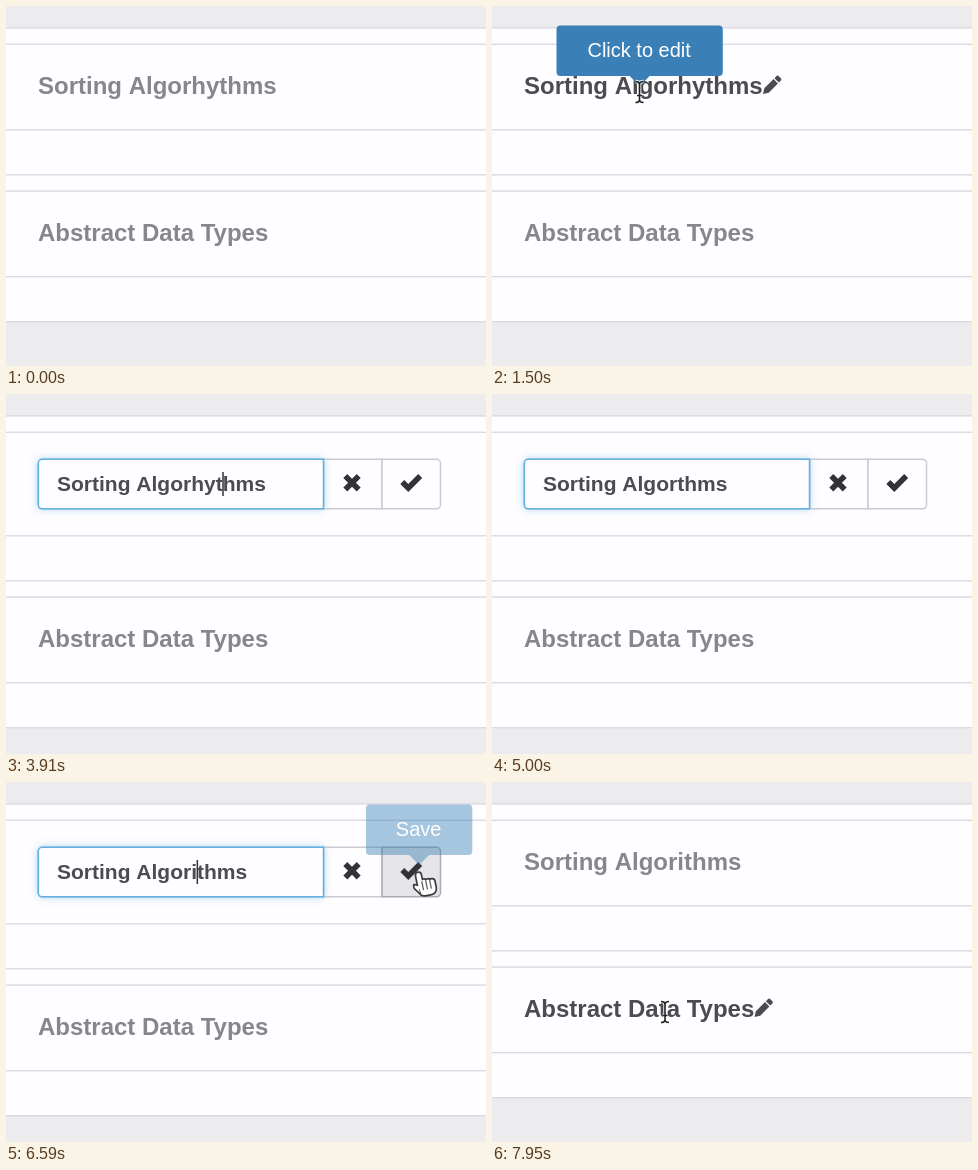
These frames come from a looping animation (480x360 px, 8 s). An HTML page with a canvas:

```html
<!DOCTYPE html>
<html lang="en">
<head>
<meta charset="utf-8">
<title>Inline title editing</title>
<style>
html, body { margin: 0; width: 100%; height: 100%; overflow: hidden; background: #ecebed; }
canvas { display: block; }
</style>
</head>
<body>
<canvas id="stage" width="480" height="360"></canvas>
<script>
const ctx = document.getElementById('stage').getContext('2d');
const LOOP = 8000, EDIT = 1680, SAVE = 7230;
const FAMILY = '"Liberation Sans", Arial, sans-serif';
const PAPER = '#fefdff', INK = '#4c4b4f', MUTED = '#87868a', ICON = '#333336', EDGE = '#cbcacf';

const keys = [
  [2950, 'left'], [3410, 'left'], [3550, 'left'], [4090, 'left'],
  [4360, 'delete'], [4500, 'delete'], [5230, 'i']
];

// Pointer moves: start, end, x, y
const moves = [
  [500, 1000, 147.5, 86], [2060, 2270, 241, 86], [2430, 2450, 305, 82], [2450, 3000, 309, 92],
  [5820, 5950, 407, 55], [5950, 6050, 426, 40], [6050, 6270, 425, 92], [6390, 6590, 412, 91],
  [7480, 7680, 190, 260], [7890, 7930, 173, 230]
];

const clamp = v => Math.max(0, Math.min(1, v));
const ramp = (t, a, b) => clamp((t - a) / (b - a));
const ease = u => u * u * (3 - 2 * u);
const inside = (p, x, y, w, h) => p && p.x >= x && p.x <= x + w && p.y >= y && p.y <= y + h;

function pointerAt(t) {
  if (t < 500 || t >= 3000 && t < 5590) return null;
  const p = { x: 160, y: 229 };
  for (const [a, b, x, y] of moves) {
    const u = ease(ramp(t, a, b));
    p.x += (x - p.x) * u;
    p.y += (y - p.y) * u;
  }
  return p;
}

function typedAt(t) {
  let str = 'Sorting Algorhythms', at = str.length;
  for (const [time, key] of keys) {
    if (time > t) break;
    const tail = str.slice(at);
    if (key === 'left') at--;
    else if (key === 'delete') str = str.slice(0, --at) + tail;
    else str = str.slice(0, at++) + key + tail;
  }
  return { str, at };
}

function text(str, x, y, size, color, weight = 'bold') {
  ctx.font = `${weight} ${size}px ${FAMILY}`;
  ctx.fillStyle = color;
  ctx.fillText(str, x, y);
}

function polyline(points, width, color) {
  ctx.beginPath();
  points.forEach(([x, y]) => ctx.lineTo(x, y));
  ctx.strokeStyle = color;
  ctx.lineWidth = width;
  ctx.stroke();
}

function box(x, w, radii, fill, stroke) {
  ctx.beginPath();
  ctx.roundRect(x, 65.3, w, 49.5, radii);
  ctx.fillStyle = fill;
  ctx.fill();
  ctx.shadowColor = 'transparent';
  ctx.strokeStyle = stroke;
  ctx.lineWidth = 1.5;
  ctx.stroke();
}

function page(shift) {
  ctx.fillStyle = '#ecebed';
  ctx.fillRect(0, 0, 480, 360);
  ctx.fillStyle = PAPER;
  ctx.fillRect(0, 22, 480, 294 + shift);
  ctx.fillStyle = '#dbdae0';
  const rule = y => ctx.fillRect(0, y, 480, 1.4);
  rule(21.2);
  rule(37.6);
  rule(184.4 + shift);
  for (const y of [123.1, 270]) {
    rule(y + shift);
    rule(y + shift + 45);
  }
}

function pencil(x, y) {
  ctx.save();
  ctx.translate(x, y);
  ctx.rotate(-Math.PI / 4);
  ctx.fillStyle = INK;
  ctx.beginPath();
  ctx.moveTo(0, 0);
  ctx.lineTo(5, -3.1);
  ctx.lineTo(18, -3.1);
  ctx.lineTo(18, 3.1);
  ctx.lineTo(5, 3.1);
  ctx.roundRect(19.3, -3.1, 4.4, 6.2, [0, 1.5, 1.5, 0]);
  ctx.fill();
  ctx.restore();
}

function title(str, y, hover, tipX) {
  text(str, 32, y, 24, hover ? INK : MUTED);
  if (hover) pencil(tipX, y);
}

function tooltip(str, x, y, w, alpha) {
  if (alpha <= 0) return;
  const mid = x + w / 2;
  ctx.save();
  ctx.globalAlpha = alpha;
  ctx.beginPath();
  ctx.roundRect(x, y, w, 50.5, 4);
  ctx.moveTo(mid - 10, y + 50.5);
  ctx.lineTo(mid + 10, y + 50.5);
  ctx.lineTo(mid, y + 60.5);
  ctx.fillStyle = '#3a80b7';
  ctx.fill();
  ctx.globalAlpha = 1;
  ctx.textAlign = 'center';
  text(str, mid - 0.5, y + 31.4, 20, '#fff', 'normal');
  ctx.restore();
}

function button(x, radii, hover) {
  box(x, 58.5, radii, hover ? '#e5e4e7' : PAPER, hover ? '#adacb0' : EDGE);
}

function field(t) {
  const glow = ramp(t, EDIT, EDIT + 220) * (1 - ramp(t, 7040, 7190));
  box(32.3, 285.2, [4, 0, 0, 4], PAPER, EDGE);
  ctx.save();
  ctx.globalAlpha = glow;
  ctx.shadowColor = 'rgba(102,180,236,.6)';
  ctx.shadowBlur = 8;
  box(32.3, 285.2, [4, 0, 0, 4], PAPER, '#66b0e0');
  ctx.restore();

  const { str, at } = typedAt(t);
  text(str, 51, 97.4, 21, INK);
  const blink = t >= 5000 && t < 5230 || t >= 5680 && t < 5860;
  if (!blink && t < 7180) {
    const x = 51 + ctx.measureText(str.slice(0, at)).width;
    ctx.fillStyle = ICON;
    ctx.fillRect(x - 0.4, 78, 1.5, 24);
  }
}

function editor(t, p) {
  button(317.5, 0, t >= 5840 && t < 6000);
  button(376, [0, 4, 4, 0], inside(p, 376, 65, 59, 50));
  field(t);
  for (const s of [-1, 1]) polyline([[346 - 6.7, 88.8 - 6.7 * s], [346 + 6.7, 88.8 + 6.7 * s]], 5.6, ICON);
  polyline([[396.3, 88], [402.3, 94], [414.2, 82]], 5.6, ICON);
}

function beam() {
  ctx.beginPath();
  for (const s of [-1, 1]) {
    ctx.moveTo(-4, 10.5 * s);
    ctx.quadraticCurveTo(0, 10.5 * s, 0, 7.5 * s);
    ctx.quadraticCurveTo(0, 10.5 * s, 4, 10.5 * s);
  }
  ctx.moveTo(0, -8);
  ctx.lineTo(0, 8);
  ctx.moveTo(-2.5, 3.5);
  ctx.lineTo(2.5, 3.5);
  for (const [color, width] of [['rgba(255,255,255,.85)', 3.6], ['#222', 1.6]]) {
    ctx.strokeStyle = color;
    ctx.lineWidth = width;
    ctx.stroke();
  }
}

function outlined(inner, outer, width) {
  ctx.lineJoin = 'round';
  ctx.strokeStyle = outer;
  ctx.lineWidth = width;
  ctx.stroke();
  ctx.fillStyle = inner;
  ctx.fill();
}

function arrow() {
  ctx.beginPath();
  [[0, 0], [0, 20], [4.6, 16], [8, 24], [11.4, 22.5], [8, 14.8], [14, 14.2]]
    .forEach(([x, y]) => ctx.lineTo(x, y));
  ctx.closePath();
  outlined('#111', '#fff', 2.4);
}

function hand() {
  ctx.rotate(-0.2);
  ctx.beginPath();
  ctx.roundRect(-2.2, 0, 4.4, 17, 2.2);
  for (let i = 1; i < 4; i++) ctx.roundRect(-2.2 + 4 * i, 7 + i * 0.7, 4.4, 9, 2.2);
  ctx.roundRect(-2.2, 11, 16.4, 12, [0, 0, 5, 5]);
  ctx.moveTo(-2.2, 13);
  ctx.lineTo(-6, 11.5);
  ctx.lineTo(-6, 14);
  ctx.lineTo(-1, 21);
  outlined('#fff', '#3c3b3f', 3.4);
  for (let x = 2; x < 12; x += 4) polyline([[x, 9], [x, 18]], 1.2, '#55545a');
}

function pointer(p, shape) {
  ctx.save();
  ctx.translate(p.x, p.y);
  shape();
  ctx.restore();
}

function draw(t) {
  const editing = t >= EDIT && t < SAVE;
  const shift = editing ? 18 : 0;
  const p = pointerAt(t);
  const overFirst = !editing && inside(p, 32, 66, 258, 38);
  const overSecond = !editing && inside(p, 32, 214, 250, 27);

  page(shift);
  if (editing) editor(t, p);
  else title(t < EDIT ? 'Sorting Algorhythms' : 'Sorting Algorithms', 88, overFirst, 271);
  title('Abstract Data Types', 235 + shift, overSecond, 262.5);

  tooltip('Click to edit', 64.5, 19.4, 166.3, ramp(t, 1300, 1470) * (1 - ramp(t, EDIT, EDIT + 150)));
  if (editing) tooltip('Save', 360, 22.6, 106.3, ramp(t, 6510, 6690));

  if (!p) return;
  const onButton = editing && inside(p, 318, 65, 117, 50) || t >= SAVE && t < 7490;
  const onText = overFirst || overSecond || editing && inside(p, 32, 65, 285, 50);
  pointer(p, onButton ? hand : onText ? beam : arrow);
}

const start = performance.now();
function frame() {
  draw((performance.now() - start) % LOOP);
  requestAnimationFrame(frame);
}
frame();
</script>
</body>
</html>
```
